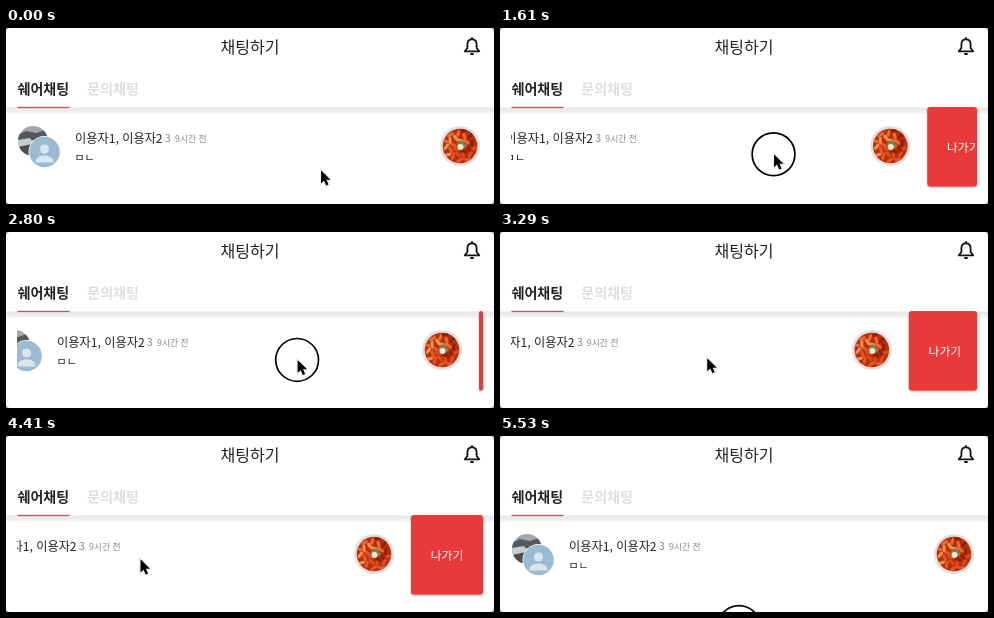
Animation of 488x176 px, one loop 5600 ms. Source, as an HTML page:

```html
<!DOCTYPE html>
<html lang="ko">
<head>
<meta charset="utf-8">
<title>채팅하기</title>
<style>
  html, body { margin: 0; width: 100%; height: 100%; overflow: hidden; background: #8a8a8a; }
  svg { display: block; width: 488px; height: 176px; font-family: "Noto Sans CJK KR", "Noto Sans CJK", "Noto Sans CJK JP", sans-serif; }
  .bold { font-weight: 700; font-size: 14px; }
  #leave { filter: drop-shadow(0 1px 1.2px rgba(0, 0, 0, .35)); }
  #arrow { filter: drop-shadow(0 .8px .8px rgba(0, 0, 0, .35)); }
</style>
</head>
<body>
<svg viewBox="0 0 488 176">
  <defs>
    <clipPath id="list"><rect x="11" y="79" width="466" height="97"/></clipPath>
    <clipPath id="panel"><rect id="panelBox" y="79" height="79.5" rx="3"/></clipPath>
    <clipPath id="photo"><circle cx="27" cy="113" r="15"/></clipPath>
    <clipPath id="face"><circle cx="38.5" cy="124" r="15.3"/></clipPath>
    <clipPath id="bowl"><circle cx="454" cy="118" r="17.3"/></clipPath>
    <linearGradient id="bar" x2="0" y2="1">
      <stop stop-color="#e6e6e6"/><stop offset="1" stop-color="#f3f3f3"/>
    </linearGradient>
  </defs>
  <rect width="488" height="176" rx="4" fill="#fff"/>

  <text x="244" y="25" font-size="16" text-anchor="middle" fill="#222">채팅하기</text>
  <g fill="none" stroke="#111" stroke-width="1.8" stroke-linejoin="round" stroke-linecap="round">
    <path d="M458.8 23.3H473.2L470.6 20V16.4C470.6 13.4 468.8 11.4 466 11.4S461.4 13.4 461.4 16.4V20Z"/>
    <path d="M465 26H467M466 10V10.8"/>
  </g>

  <text class="bold" x="11.5" y="66.3" fill="#222">쉐어채팅</text>
  <text class="bold" x="81.3" y="66.3" fill="#dedede">문의채팅</text>
  <rect y="79.5" width="488" height="6" fill="url(#bar)"/>
  <rect x="11.5" y="78.8" width="52" height="1.3" fill="#bd5560"/>

  <g clip-path="url(#list)">
    <g id="row">
      <g clip-path="url(#photo)">
        <rect x="12" y="98" width="30" height="30" fill="#a3a7aa"/>
        <path d="M12 107L20 103 30 105 42 101V112H12Z" fill="#55595c"/>
        <path d="M12 112L24 110 30 119 12 120Z" fill="#c9cccd"/>
        <path d="M12 119L26 116V128H12Z" fill="#4b4e51"/>
      </g>
      <circle cx="38.5" cy="124" r="16" fill="#fff"/>
      <g clip-path="url(#face)">
        <rect x="23" y="108" width="32" height="32" fill="#9abbd3"/>
        <g fill="#d8e5ee">
          <circle cx="38.5" cy="121" r="4.6"/>
          <path d="M29.5 134.5C29.5 129.5 33 127.5 38.5 127.5S47.5 129.5 47.5 134.5Z"/>
        </g>
      </g>
      <text x="69" y="114.6" font-size="12.2" fill="#222">이용자1, 이용자2</text>
      <text x="158.8" y="114.3" font-size="11" fill="#8a8a8a">3</text>
      <text x="169" y="113.6" font-size="8.8" fill="#8a8a8a">9시간 전</text>
      <text x="68.5" y="134" font-size="11" fill="#222">ㅁㄴ</text>

      <circle cx="454" cy="118" r="20" fill="#e2dfdc"/>
      <g clip-path="url(#bowl)">
        <rect x="434" y="98" width="40" height="40" fill="#b5300f"/>
        <g id="stew"></g>
      </g>
      <circle cx="455" cy="117" r="4.4" fill="#7c8048"/>
      <circle cx="454.5" cy="119" r="3" fill="#f1ead2"/>
    </g>
  </g>

  <g id="leave">
    <g clip-path="url(#panel)">
      <rect x="400" y="79" width="77" height="80" fill="#e83a3b"/>
      <text id="label" y="123.5" font-size="11.8" fill="#fff">나가기</text>
    </g>
  </g>

  <g id="pointer">
    <circle id="press" cx="-.5" cy="1.3" r="21.4" fill="none" stroke="#000" stroke-width="1.7"/>
    <path id="arrow" transform="translate(0 1.3) scale(.84)" d="M0 0V15.6L3.6 12.3 6.2 18.1 9 16.9 6.5 11.3H11.4Z"
      stroke="#fff" stroke-width="2" paint-order="stroke"/>
  </g>
</svg>
<script>
  const LOOP = 5600, STEP = 70, WIDTH = 86, EDGE = 477;
  const $ = id => document.getElementById(id);

  const swipes = [
    { open: [1330, 1750], close: [2047, 2450] },
    { open: [2654, 3150], close: [3220, 3768] },
    { open: [3850, 4400], close: [4480, 5110] }
  ];
  const home = { x: 315, y: 141 };
  const moves = [
    { from: 0, to: 420, x: 448, y: 95 },
    { from: 420, to: 1260, x: 377, y: 119 },
    { from: 1330, to: 1750, x: 238, y: 127 },
    { from: 1890, to: 1960, x: 343, y: 127 },
    { from: 2030, to: 2170, x: 315, y: 127 },
    { from: 2654, to: 3150, x: 203, y: 125 },
    { from: 3220, to: 3710, x: 279.5, y: 122 },
    { from: 3850, to: 4410, x: 134.5, y: 122 },
    { from: 4480, to: 5110, x: 200, y: 151 },
    { from: 5460, to: 5530, x: 239.5, y: 189.7 }
  ];

  const within = (t, a, b) => t >= a && t < b;

  function ease(t, from, to) {
    const p = Math.min(1, Math.max(0, (t - from) / (to - from)));
    return p * p * (3 - 2 * p);
  }

  const rowOffset = t => -WIDTH * swipes.reduce(
    (sum, { open, close }) => sum + ease(t, ...open) - ease(t, ...close), 0);

  const pointerAt = t => moves.reduce((pos, m) => {
    const p = ease(t, m.from, m.to);
    return { x: pos.x + (m.x - pos.x) * p, y: pos.y + (m.y - pos.y) * p };
  }, home);

  function makeStew() {
    const tones = ["#ee6a30", "#e04a1c", "#f5924f", "#8f210c", "#e8572a"];
    let pieces = "";
    for (let i = 0; i < 26; i++) {
      pieces += `<rect x="-3.6" y="-1.5" width="7.2" height="3" rx="1.4" fill="${tones[i % 5]}"
        transform="translate(454 118) rotate(${i * 137.5}) translate(${3.2 * Math.sqrt(i + 1)}) rotate(${i * 50})"/>`;
    }
    $("stew").innerHTML = pieces;
  }

  function show(id, visible) {
    $(id).style.display = visible ? "" : "none";
  }

  function draw(now) {
    const t = Math.floor(now % LOOP / STEP) * STEP;
    const dx = rowOffset(t), left = EDGE + 14 + dx;
    $("row").setAttribute("transform", `translate(${dx})`);
    $("panelBox").setAttribute("x", left);
    $("panelBox").setAttribute("width", Math.max(0, EDGE - left));
    $("label").setAttribute("x", left + 19.7);
    show("leave", left < EDGE);

    const { x, y } = pointerAt(t);
    $("pointer").setAttribute("transform", `translate(${x} ${y})`);
    show("pointer", !within(t, 5110, 5530));
    show("press", within(t, 1120, 2450) || within(t, 2590, 3290) || t >= 5530);
  }

  makeStew();
  const start = performance.now();
  function tick() {
    draw(performance.now() - start);
    requestAnimationFrame(tick);
  }
  tick();
</script>
</body>
</html>
```
